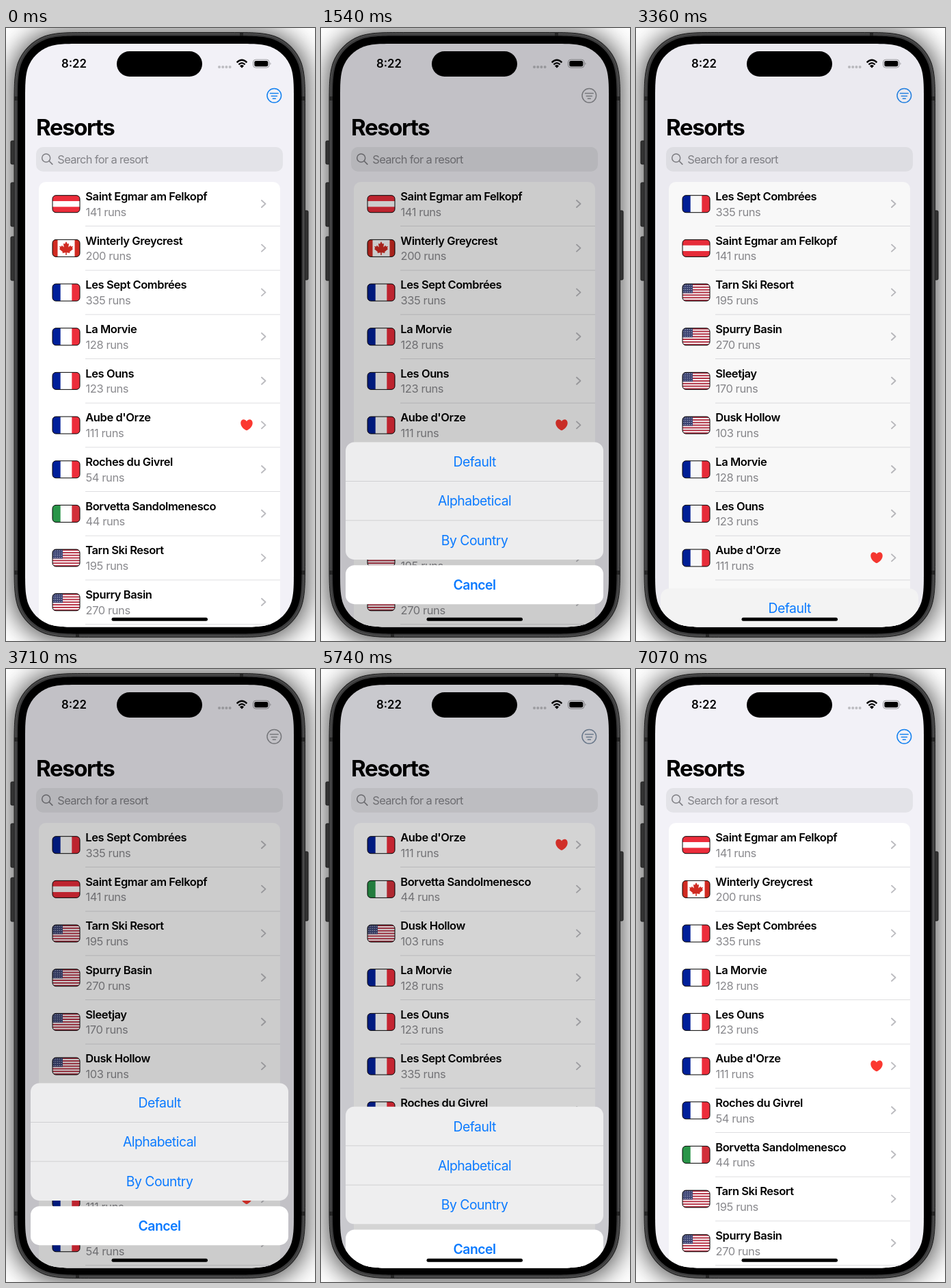
An HTML page for the animation above (8000 ms loop, 452 px wide and 896 px high).

```html
<!DOCTYPE html>
<html lang="en">
<head>
<meta charset="utf-8">
<title>Resorts</title>
<style>
html, body { margin: 0; width: 100%; height: 100%; overflow: hidden; background: #fff; }
svg { display: block; width: 452px; height: 896px; }
text { font-family: Inter, Roboto, sans-serif; letter-spacing: -.026em; }
.name { font-size: 16.5px; font-weight: 600; }
.runs { font-size: 16.5px; fill: #8a8a8e; }
.title { font-size: 33px; font-weight: 700; letter-spacing: -.042em; }
.hint { font-size: 16.5px; fill: #838388; letter-spacing: -.042em; }
.clock { font-size: 16.8px; font-weight: 600; letter-spacing: 0; }
.action { font-size: 19.4px; fill: #0a7aff; text-anchor: middle; }
</style>
</head>
<body>
<svg id="stage" viewBox="0 0 452 896" xmlns="http://www.w3.org/2000/svg"></svg>
<script>
const LOOP = 8000;
const SHEET_TOP = 604, TRAVEL = 272, ROW = 64.67, ACTION = 57.33;

// Listed by country: name, runs, flag, favourite
const resorts = [
  ['Saint Egmar am Felkopf', 141, 'at'],
  ['Winterly Greycrest', 200, 'ca'],
  ['Les Sept Combrées', 335, 'fr'],
  ['La Morvie', 128, 'fr'],
  ['Les Ouns', 123, 'fr'],
  ["Aube d'Orze", 111, 'fr', true],
  ['Roches du Givrel', 54, 'fr'],
  ['Borvetta Sandolmenesco', 44, 'it'],
  ['Tarn Ski Resort', 195, 'us'],
  ['Spurry Basin', 270, 'us'],
  ['Sleetjay', 170, 'us'],
  ['Dusk Hollow', 103, 'us']
];
const lists = {
  country: resorts,
  standard: [2, 0, 8, 9, 10, 11, 3, 4, 5, 6, 7, 1].map(i => resorts[i]),
  alphabetical: [...resorts].sort((a, b) => a[0] < b[0] ? -1 : 1)
};

// Each visit to the action sheet, in ms
const visits = [
  { press: 1050, show: 1147, tap: 2100, hide: 2227, sort: 2790, row: 0, list: 'standard' },
  { press: 3220, show: 3317, tap: 4130, hide: 4210, sort: 4730, row: 1, list: 'alphabetical' },
  { press: 5460, show: 5557, tap: 6440, hide: 6520, sort: 7040, row: 2, list: 'country' }
];

const times = (n, f) => Array.from({ length: n }, (_, i) => f(i)).join('');
const rect = (x, y, w, h, fill, r = 0, more = '') =>
  `<rect x="${x}" y="${y}" width="${w}" height="${h}" rx="${r}" fill="${fill}" ${more}/>`;
const line = (d, stroke, width, more = '') =>
  `<path d="${d}" fill="none" stroke="${stroke}" stroke-width="${width}" ${more}/>`;

// Rectangle with continuous corners, which blend gradually into the sides
const bend = [[0, 1.529], [0, 1.088], [0, .868], [.075, .631], [.169, .373]];
const corner = [...bend, ...bend.map(([a, b]) => [b, a]).reverse()];
function squircle(x, y, w, h, r, fill, more = '') {
  const turn = (right, low) => {
    const pts = corner.map(([a, b]) => `${right ? x + w - a * r : x + a * r} ${low ? y + h - b * r : y + b * r}`);
    if (right !== low) pts.reverse();
    return `${pts[0]}C${pts.slice(1)}`;
  };
  const d = [turn(false, false), turn(true, false), turn(true, true), turn(false, true)].join('L');
  return `<path d="M${d}Z" fill="${fill}" ${more}/>`;
}

// Flags are 50 by 25, cropped to the middle 40
const stripes = (a, b) => rect(0, 0, 16.67, 25, a) + rect(33.33, 0, 16.67, 25, b);
const leaf = 'M25 2.7l2 3.6 2.1-.9-.8 5.7 3-2.6.8 1.6 2.8-.5-1 3.1 1.2 1-5 4.2.5 1.7-4.9-.7.2 3.6h-1.8' +
  'l.2-3.6-4.9.7.5-1.7-5-4.2 1.2-1-1-3.1 2.8.5.8-1.6 3 2.6-.8-5.7 2.1.9z';
const flags = {
  at: rect(0, 0, 50, 8.33, '#ec2d3b') + rect(0, 16.67, 50, 8.33, '#ec2d3b'),
  ca: rect(0, 0, 12.5, 25, '#d02b22') + rect(37.5, 0, 12.5, 25, '#d02b22') + `<path d="${leaf}" fill="#d02b22"/>`,
  fr: stripes('#00209a', '#ec2d3b'),
  it: stripes('#2a9549', '#d2303a'),
  us: times(7, i => rect(0, i * 3.846, 50, 1.923, '#b42d41')) + rect(0, 0, 20, 13.46, '#3b4373') +
    times(20, i => `<circle cx="${7 + i % 5 * 2.8}" cy="${2 + Math.floor(i / 5) * 3.2}" r=".6" fill="#d5d7e4"/>`)
};
const flagDef = ([code, art]) =>
  `<g id="${code}"><g clip-path="url(#flag)">${rect(0, 0, 40, 25, '#fff')}<g transform="translate(-5 0)">${art}</g></g>` +
  rect(0, 0, 40, 25, 'none', 5, 'stroke="#000"') + '</g>';

const heart = '<path d="M352 265C347 263 343.3 258.5 343.3 254.2C343.3 247.6 350 247.4 352 251.6' +
  'C354 247.4 360.7 247.6 360.7 254.2C360.7 258.5 357 263 352 265Z" fill="#fb3830"/>';

const row = ([name, runs, flag, loved], i) => `<g transform="translate(0 ${i * ROW})">
  <use href="#${flag}" x="68" y="244.7"/>
  <text class="name" x="116.3" y="252">${name}</text>
  <text class="runs" x="116.5" y="274.5">${runs} runs</text>
  ${loved ? heart : ''}
  ${line('M374 252l5.5 5-5.5 5', '#bcbcc0', 1.9, 'stroke-linecap="round" stroke-linejoin="round"')}
  ${line('M116 289.5H401', '#dedee1', 1)}
</g>`;

const button = (x, y, h) => rect(x, y, 8, h, '#333', 1.5, 'stroke="#1a1a1a"');
const antenna = (x, y) => rect(x, y, 5, 6, '#252525');
const phone = `
  ${rect(8, 4, 434, 892, '#000', 72, 'filter="url(#glow)" opacity=".68"')}
  ${button(7, 165, 34)}${button(7, 226, 64)}${button(7, 305, 64)}${button(434, 267, 101)}
  ${squircle(12, 6.5, 425.5, 884, 71, '#3b3b3c', 'stroke="#252525"')}
  ${squircle(14, 8.5, 421.5, 880, 69, 'none', 'stroke="#555"')}
  ${antenna(12, 100)}${antenna(432, 100)}${antenna(12, 793)}${antenna(432, 793)}
  ${antenna(342, 7)}${antenna(102, 885)}
  ${squircle(17, 11.5, 415.5, 874, 66, '#000')}`;

const status = `
  <text class="clock" x="81" y="58.2">8:22</text>
  ${times(4, i => `<circle cx="${312 + i * 5.2}" cy="57" r="2" fill="#bdbdc2"/>`)}
  ${line('M337.6 50.3Q345 43.2 352.4 50.3M340.4 53.3Q345 49 349.6 53.3', '#000', 2.3)}
  <path d="M342 55.4Q345 52.8 348 55.4L345 58.4Z"/>
  ${rect(361.5, 46.2, 23.5, 11.8, 'none', 3.8, 'stroke="#97979b"')}
  ${rect(363.3, 48, 20, 8.2, '#000', 2.3)}
  <path d="M386.5 50.2q2 1.9 0 3.8z" fill="#97979b"/>`;

const page = `
  ${rect(28, 23, 393, 853, '#f2f1f7')}
  ${status}
  <g id="filter" fill="none" stroke-width="1.5" stroke-linecap="round">
    <circle cx="392.3" cy="98.8" r="10.3"/>
    <path d="M386.4 95.6h11.8M388.2 99.4h8.2M390.3 103.2h4"/>
  </g>
  <text class="title" x="44" y="157">Resorts</text>
  ${rect(44, 174, 361, 35.7, '#e3e3e8', 10)}
  <circle cx="58.7" cy="190" r="6" fill="none" stroke="#7f7f84" stroke-width="1.5"/>
  ${line('M63.2 194.5l4.6 4.6', '#7f7f84', 1.7, 'stroke-linecap="round"')}
  <text class="hint" x="75.3" y="198">Search for a resort</text>
  ${rect(48, 225, 353, 700, '#fff', 10)}
  ${Object.entries(lists).map(([id, items]) => `<g id="${id}">${items.map(row).join('')}</g>`).join('')}`;

const actions = ['Default', 'Alphabetical', 'By Country'];
const sheet = `<g id="sheet">
  <g clip-path="url(#group)">
    <rect id="panel" x="36" width="377" height="172"/>
    <rect id="touch" x="36" width="377" height="${ACTION}" fill="#d8d8da"/>
    ${line(`M36 ${ACTION}H413M36 ${2 * ACTION}H413`, '#d0d0d2', 1)}
  </g>
  ${actions.map((label, i) => `<text class="action" x="224.6" y="${36 + i * ACTION}">${label}</text>`).join('')}
  ${rect(36, 180, 377, 57, '#fff', 13)}
  <text class="action" x="224.6" y="215.6" font-weight="600">Cancel</text>
</g>`;

document.getElementById('stage').innerHTML = `
  <defs>
    <filter id="glow" x="-20%" y="-10%" width="140%" height="120%"><feGaussianBlur stdDeviation="18"/></filter>
    <clipPath id="screen">${squircle(28, 23, 393, 852.5, 55, '#000')}</clipPath>
    <clipPath id="flag">${rect(0, 0, 40, 25, '#000', 5)}</clipPath>
    <clipPath id="group">${rect(36, 0, 377, 172, '#000', 13)}</clipPath>
    ${Object.entries(flags).map(flagDef).join('')}
  </defs>
  ${rect(0, 0, 452, 896, '#fff')}
  ${phone}
  <g clip-path="url(#screen)">
    ${page}
    ${rect(28, 23, 393, 853, '#000', 0, 'id="shade"')}
    ${rect(162, 34, 125, 37, '#000', 18.5)}
    ${sheet}
    ${rect(154.5, 861.7, 140.5, 5, '#000', 2.5)}
  </g>`;

const $ = id => document.getElementById(id);
const set = (id, attrs) => Object.entries(attrs).forEach(([k, v]) => $(id).setAttribute(k, v));
const mix = (a, b, p) => `rgb(${a.map((v, i) => Math.round(v + (b[i] - v) * p))})`;

// Critically damped spring: share of the way still to go
const spring = ms => {
  const x = .0193 * Math.max(0, ms);
  return (1 + x) * Math.exp(-x);
};

function draw(t) {
  const visit = visits.filter(v => t >= v.press).pop();
  let open = 0, pressed = false, touched = false;
  if (visit) {
    open = t < visit.hide ? 1 - spring(t - visit.show) : spring(t - visit.hide);
    pressed = t < visit.show;
    touched = t >= visit.tap && t < visit.hide;
  }
  if (open < .002) open = 0;
  const dim = open ** 1.3;

  const sorted = visits.filter(v => t >= v.sort).pop();
  const current = sorted ? sorted.list : 'country';
  for (const id in lists) set(id, { display: id === current ? 'inline' : 'none' });

  set('filter', {
    stroke: mix([20, 130, 240], [148, 148, 153], dim),
    opacity: pressed ? .35 : 1
  });
  set('shade', { opacity: .2 * dim });
  set('sheet', {
    display: open ? 'inline' : 'none',
    transform: `translate(0 ${SHEET_TOP + TRAVEL * (1 - open)})`
  });
  set('panel', { fill: mix([244, 244, 244], [237, 237, 238], open) });
  set('touch', { y: visit ? visit.row * ACTION : 0, opacity: touched ? 1 : 0 });
}

const start = performance.now();
function tick() {
  draw((performance.now() - start) % LOOP);
  requestAnimationFrame(tick);
}
tick();
</script>
</body>
</html>
```
